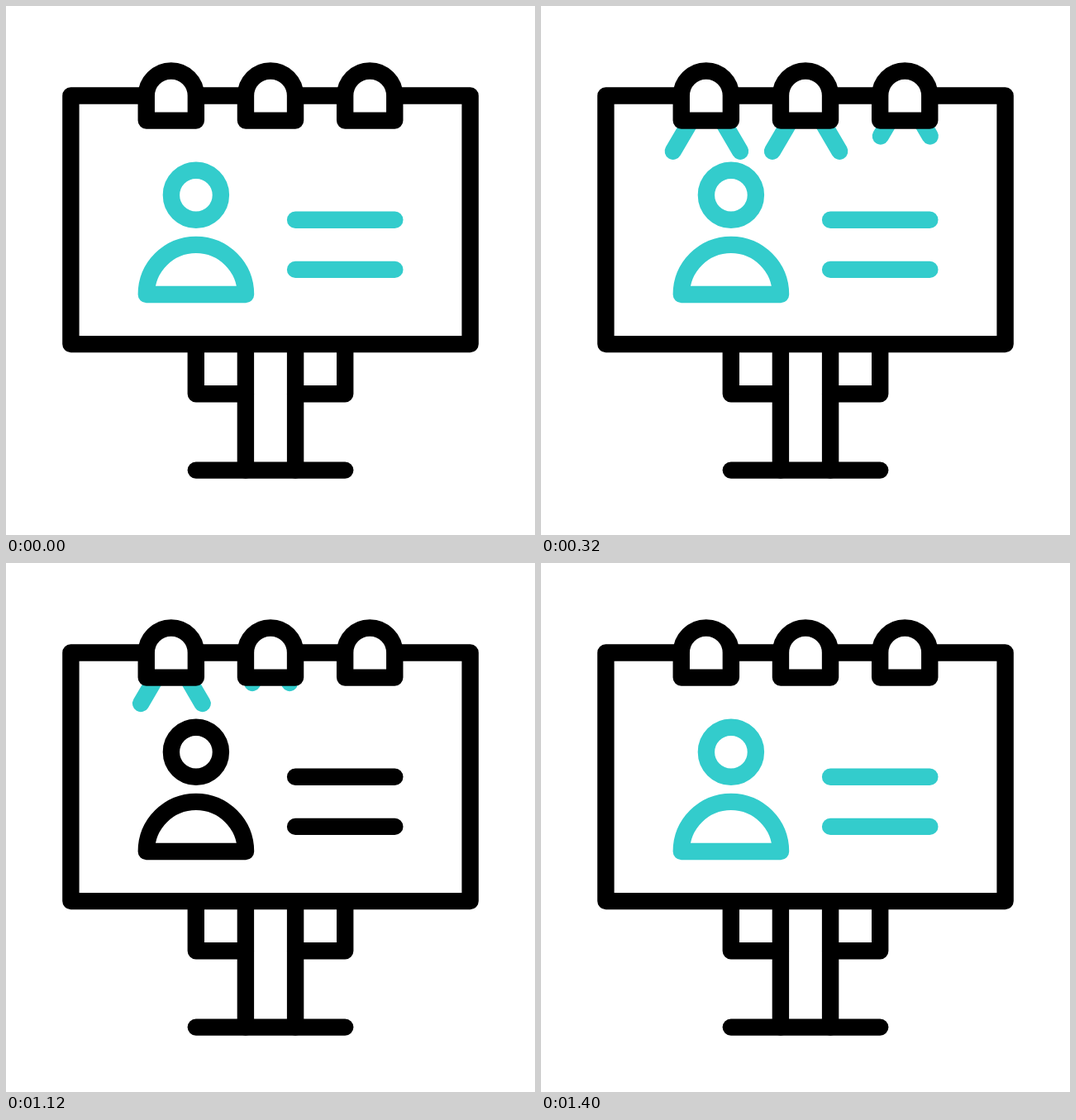
Animation, 640 px wide and 640 px high, one loop 1.48 s. Source, as an HTML page with a canvas:

```html
<!DOCTYPE html>
<html lang="en">
<head>
<meta charset="utf-8">
<title>Billboard</title>
<style>
html, body { margin: 0; width: 100%; height: 100%; overflow: hidden; background: #fff; }
canvas { display: block; width: 640px; height: 640px; }
</style>
</head>
<body>
<canvas id="stage" width="640" height="640"></canvas>
<script>
const ctx = document.getElementById("stage").getContext("2d");
const LOOP = 1480, STEP = 40;
const TEAL = [51, 204, 204];
const WIDTH = 20.4;
const CLAMPS = [199.8, 320, 440.2];

// Keys are [time, value] pairs, eased in and out between neighbours.
function track(keys, t) {
  if (t <= keys[0][0]) return keys[0][1];
  for (let i = 1; i < keys.length; i++) {
    const [t0, v0] = keys[i - 1], [t1, v1] = keys[i];
    if (t <= t1) {
      const x = (t - t0) / (t1 - t0);
      return v0 + (v1 - v0) * x * x * (3 - 2 * x);
    }
  }
  return keys[keys.length - 1][1];
}

const LIFT = [[80, 0], [200, -16.6], [320, 0]];
const TINT = [[80, 1], [200, 0.525], [320, 1], [520, 0], [1120, 0], [1320, 1]];

function beamLength(i, t) {
  const on = 80 + 80 * i, off = 1240 - 80 * i;
  return track([[on, 0], [on + 160, 1], [off - 160, 1], [off, 0]], t);
}

function line(...p) {
  ctx.beginPath();
  for (let i = 0; i < p.length; i += 2) ctx.lineTo(p[i], p[i + 1]);
  ctx.stroke();
}

function drawBoard() {
  ctx.strokeStyle = "#000";
  for (const side of [-1, 1]) {
    const x = k => 320 + side * k;
    line(x(90.2), 409.1, x(90.2), 469.2, x(30.1), 469.2);
    line(x(30.1), 409.1, x(30.1), 561.6);
  }
  line(229.8, 561.6, 410.2, 561.6);
  ctx.strokeRect(78.4, 108.5, 483.2, 300.6);
}

function drawCard(tint) {
  ctx.strokeStyle = `rgb(${TEAL.map(c => Math.round(c * tint)).join()})`;
  ctx.beginPath();
  ctx.arc(229.9, 228.8, 30, 0, Math.PI * 2);
  ctx.stroke();
  ctx.beginPath();
  ctx.arc(229.9, 349, 60.1, Math.PI, 0);
  ctx.closePath();
  ctx.stroke();
  line(350.1, 258.8, 470.3, 258.8);
  line(350.1, 318.9, 470.3, 318.9);
}

function drawBeams(cx, amount) {
  if (amount <= 0) return;
  ctx.strokeStyle = `rgb(${TEAL.join()})`;
  const y = 139.2, dx = 21.4 * amount, dy = 36.5 * amount;
  line(cx - 18.6, y, cx - 18.6 - dx, y + dy);
  line(cx + 19.8, y, cx + 19.8 + dx, y + dy);
}

function drawClamp(cx) {
  ctx.strokeStyle = "#000";
  ctx.fillStyle = "#fff";
  ctx.beginPath();
  ctx.arc(cx, 108.5, 30.05, Math.PI, 0);
  ctx.lineTo(cx + 30.05, 138.6);
  ctx.lineTo(cx - 30.05, 138.6);
  ctx.closePath();
  ctx.fill();
  ctx.stroke();
}

function draw(t) {
  ctx.setTransform(1, 0, 0, 1, 0, 0);
  ctx.fillStyle = "#fff";
  ctx.fillRect(0, 0, 640, 640);
  ctx.translate(0, track(LIFT, t));
  ctx.lineWidth = WIDTH;
  ctx.lineCap = ctx.lineJoin = "round";
  drawBoard();
  drawCard(track(TINT, t));
  CLAMPS.forEach((cx, i) => drawBeams(cx, beamLength(i, t)));
  CLAMPS.forEach(drawClamp);
}

const start = performance.now();
function tick() {
  const t = Math.max(0, performance.now() - start) % LOOP;
  draw(Math.floor(t / STEP) * STEP);
  requestAnimationFrame(tick);
}
tick();
</script>
</body>
</html>
```
